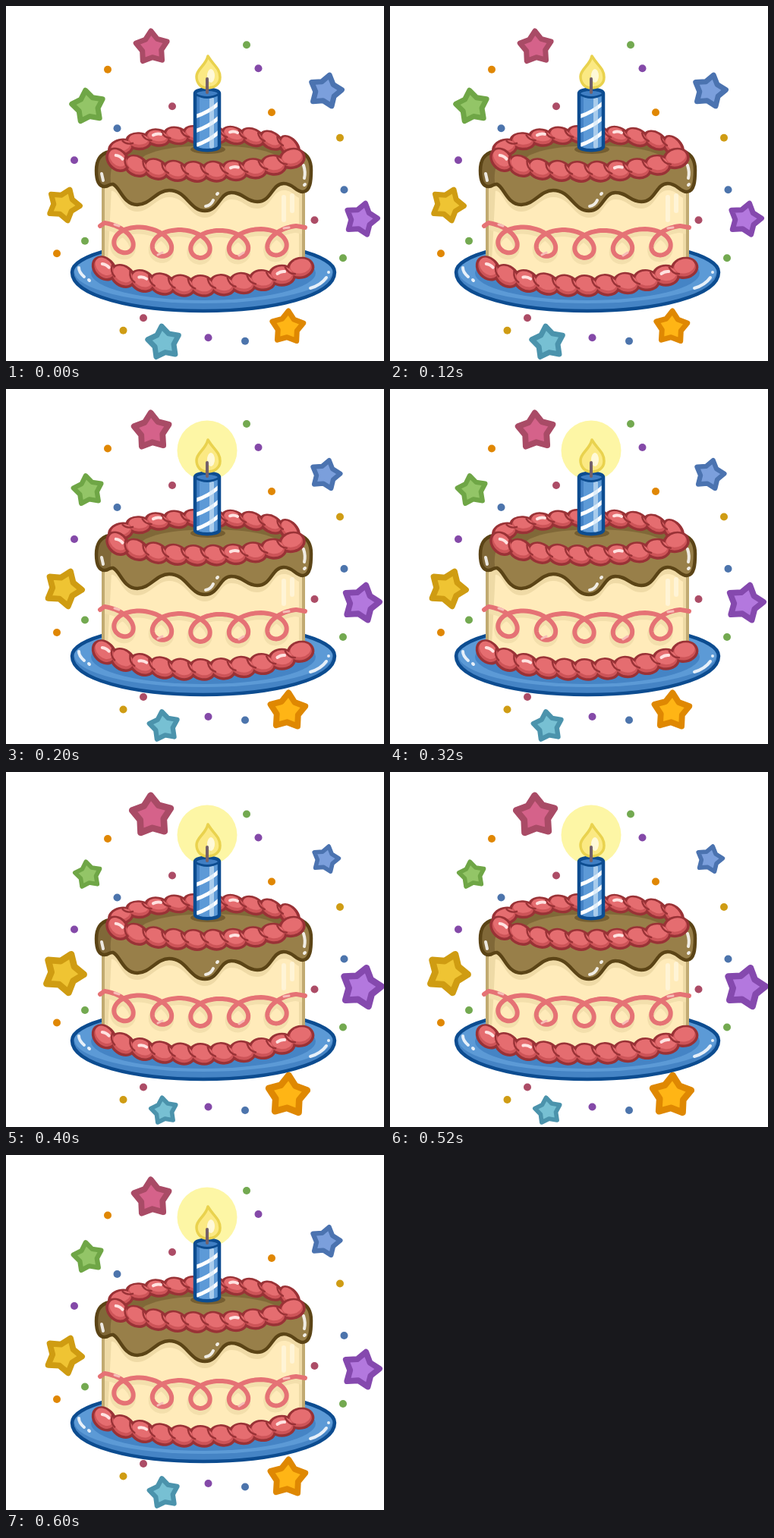
These frames come from a looping animation (498 by 468 pixels, 800 ms). An HTML page:

```html
<!DOCTYPE html>
<html lang="en">
<head>
<meta charset="utf-8">
<title>Birthday cake</title>
<style>
html, body { margin: 0; width: 100%; height: 100%; overflow: hidden; background: #fff; }
svg { display: block; width: 100vw; height: 100vh; }
path { stroke-linecap: round; stroke-linejoin: round; }
.shine { fill: none; stroke: #fff; stroke-width: 4; opacity: .85; }
</style>
</head>
<body>
<svg viewBox="0 0 498 468">
  <defs>
    <path id="drip" d="M136 192 C123 195 119 204 119 217 C119 229 122 238 130 238
      C136 238 136 234 141 235 C150 238 154 262 173 262 C190 262 198 243 215 243
      C238 243 242 270 262 270 C281 270 281 246 297 246 C313 246 316 258 331 258
      C350 258 350 234 366 234 C379 234 381 245 391 245 C401 245 402 230 402 216
      C402 204 398 196 388 192 C350 158 174 158 136 192Z"/>
    <path id="side" d="M128 215 V346 Q260 396 392 346 V215Z"/>
    <path id="plate" d="M87 351 A173 42 0 0 1 433 351 C433 382 352 402 260 402 C168 402 87 382 87 351Z"/>
    <path id="stick" d="M249 115 C249 108 281 108 281 115 V185 C281 192 249 192 249 185Z"/>
    <clipPath id="inSide"><use href="#side"/></clipPath>
    <clipPath id="inDrip"><use href="#drip"/></clipPath>
    <clipPath id="inPlate"><use href="#plate"/></clipPath>
    <clipPath id="inStick"><use href="#stick"/></clipPath>
  </defs>
  <g id="dots"></g>
  <g id="stars"></g>
  <g id="cake">
    <circle id="glow" cx="265" cy="80" r="39.5" fill="#fdf6a5"/>

    <use href="#plate" fill="#4584c5"/>
    <g clip-path="url(#inPlate)">
      <ellipse cx="260" cy="350" rx="170" ry="42" fill="#5c9ad6"/>
      <ellipse cx="260" cy="352" rx="148" ry="36" fill="#4584c5"/>
    </g>
    <use href="#plate" fill="none" stroke="#0c4c90" stroke-width="4.5"/>
    <path class="shine" d="M96 345 Q96 351 103 357 M109 361 L110 362 M401 372 Q415 368 422 358 M425 351 L425 351"/>

    <use href="#side" fill="#ffebba"/>
    <g clip-path="url(#inSide)">
      <path d="M128 215 H140 Q137 290 133 352 H128Z M392 215 H386 V352 H392Z" fill="#eedaa6"/>
      <use href="#drip" y="9" fill="#efdaa6"/>
      <path d="M366 252 V282 M377 250 V270" fill="none" stroke="#fff4d6" stroke-width="6"/>
      <path id="swirlShade" transform="translate(-1 5)" fill="none" stroke="#f3dfac" stroke-width="8"/>
    </g>
    <use href="#side" fill="none" stroke="#c1aa71" stroke-width="4"/>
    <path id="swirl" fill="none" stroke="#e57275" stroke-width="6"/>
    <path d="M143 288 L149 290 M200 328 L206 325 M307 329 L313 325 M366 293 L373 292" stroke="#f7bdb8" stroke-width="3"/>

    <use href="#drip" fill="#987f49"/>
    <path d="M110 190 H152 Q132 212 140 245 H110Z" fill="#806838" clip-path="url(#inDrip)"/>
    <use href="#drip" fill="none" stroke="#5b4416" stroke-width="4.5"/>
    <ellipse cx="262" cy="197" rx="112" ry="24" fill="#806838"/>
    <ellipse cx="270" cy="204" rx="92" ry="20" fill="#987f49"/>
    <ellipse cx="266" cy="189" rx="23" ry="6" fill="#755e31"/>
    <path class="shine" d="M126 221 L128 230 M392 210 Q395 219 393 227 M394 235 L393 236 M263 264 Q270 263 273 256 M278 248 L279 247"/>
    <g id="ropes"></g>

    <use href="#stick" fill="#5d9ad7"/>
    <g clip-path="url(#inStick)">
      <path d="M249 110 H255 V195 H249Z" fill="#4482c6"/>
      <path d="M249 146 Q268 140 283 126 M249 165 Q268 159 283 145 M249 184 Q268 178 283 164" fill="none" stroke="#fff" stroke-width="5"/>
      <path d="M271 123 V185" stroke="#d3e6f8" stroke-width="6" opacity=".65"/>
    </g>
    <ellipse cx="265" cy="115" rx="15" ry="5" fill="#407fc4"/>
    <use href="#stick" fill="none" stroke="#0c4c90" stroke-width="4.5"/>
    <path d="M249 116 Q265 125 281 116" fill="none" stroke="#0c4c90" stroke-width="3"/>
    <path d="M266 66 C273 78 282 82 282 94 C282 103 275 108 265 108 C256 108 251 101 251 93 C251 83 263 79 266 66Z" fill="#fbe983" stroke="#e9d24e" stroke-width="3.5"/>
    <ellipse cx="270" cy="92" rx="5" ry="9" fill="#fff9d8"/>
    <path d="M265 96 V114" stroke="#74616a" stroke-width="4"/>
  </g>
</svg>
<script>
const $ = id => document.getElementById(id);
const deg = Math.PI / 180;

// Twisted icing laid along a path; `shiny` lists the twists with a highlight
function rope(d, count, rx, ry, shiny) {
  const track = document.createElementNS("http://www.w3.org/2000/svg", "path");
  track.setAttribute("d", d);
  const len = track.getTotalLength();
  const at = s => track.getPointAtLength(Math.max(0, Math.min(len, s)));
  const twists = Array.from({ length: count }, (_, i) => {
    const s = (i + .5) * len / count, p = at(s), a = at(s - 3), b = at(s + 3);
    return { x: p.x, y: p.y, turn: Math.atan2(b.y - a.y, b.x - a.x) / deg };
  });
  const layer = (fill, grow, dy) => twists.map(t =>
    `<ellipse rx="${rx + grow}" ry="${ry + grow}" fill="${fill}" transform="translate(${t.x} ${t.y + dy}) rotate(${t.turn + 18})"/>`).join("");
  const each = (shape, list) => list.map(t =>
    `<g transform="translate(${t.x} ${t.y}) rotate(${t.turn})">${shape}</g>`).join("");
  const half = len / count / 2;
  return layer("#993236", 3.5, 0) + layer("#cd5458", 0, 0) + layer("#e56d70", -1.5, -2.5) +
    each(`<path d="M${half - 6} ${-ry + 2} Q${half - 4} 1 ${half + 4} 3" fill="none" stroke="#993236" stroke-width="2.4"/>`, twists.slice(0, -1)) +
    each(`<path d="M-5 -4 Q0 -6 5 -4" fill="none" stroke="#ffe3e1" stroke-width="4"/>`, twists.filter((_, i) => shiny.includes(i)));
}
$("ropes").innerHTML =
  rope("M143 196 C154 161 370 161 382 194", 10, 14, 8.5, [2, 6]) +
  rope("M138 194 C150 227 372 227 386 192", 10, 14.5, 10.5, [0, 6]) +
  rope("M118 339 C148 360 200 369 250 369 S370 362 399 338", 11, 15, 11, [0, 2, 9]);

// Looping piped line on the side
let curl = "M124 290";
for (let u = -.5; u <= 4.51; u += .02) {
  const w = u * 2 * Math.PI, x = 155 + 50.5 * u - 24 * Math.sin(w);
  curl += `L${x.toFixed(1)} ${(314 + 18 * Math.cos(w) - 5 * ((x - 272) / 100) ** 2).toFixed(1)}`;
}
curl += "L394 292";
$("swirl").setAttribute("d", curl);
$("swirlShade").setAttribute("d", curl);

// x, y, tilt, grows, fill, edge
const stars = [
  [192, 54.5, -3, 1, "#d5628a", "#a94b66"],
  [108, 132.5, -9, 0, "#93c567", "#6fa646"],
  [421, 112, 14, 0, "#7b9fdc", "#4b73b0"],
  [76, 262, 22, 1, "#efc433", "#cf9c12"],
  [468, 281, 15, 1, "#b378de", "#8549ae"],
  [208, 443.5, -8, 0, "#77c0d3", "#4b93ac"],
  [371, 423.5, 3, 1, "#ffb515", "#df8802"]
];
const starPath = "M" + Array.from({ length: 10 }, (_, i) => {
  const r = i % 2 ? 13.2 : 21.5, a = (i * 36 - 90) * deg;
  return `${(r * Math.cos(a)).toFixed(2)} ${(r * Math.sin(a)).toFixed(2)}`;
}).join("L") + "Z";
$("stars").innerHTML = stars.map(s =>
  `<path d="${starPath}" fill="${s[4]}" stroke="${s[5]}" stroke-width="7"/>`).join("");

const dots = {
  "#73a950": [[317, 46], [104, 304.5], [444, 327]],
  "#e08703": [[134, 78.5], [350, 135], [67, 321]],
  "#8449a8": [[332.5, 77], [90, 198], [266.5, 432]],
  "#ac4c66": [[219, 127], [406.5, 277], [181, 406]],
  "#cf9c14": [[440, 168.5], [154.5, 422.5]],
  "#4c74ac": [[146.5, 156], [445.5, 237], [315, 436.5]]
};
$("dots").innerHTML = Object.entries(dots).map(([c, list]) =>
  list.map(([x, y]) => `<circle cx="${x}" cy="${y}" r="5" fill="${c}"/>`).join("")).join("");

const poses = [
  { drop: 0, bob: 5.3, size: 0 },
  { drop: 1, bob: 0, size: 1 },
  { drop: 3, bob: 9.5, size: 2 },
  { drop: 2, bob: 1, size: 1 }
];

function draw() {
  const step = Math.floor(performance.now() % 800 / 200);
  const { drop, bob, size } = poses[step];
  $("cake").setAttribute("transform", `translate(0 ${drop})`);
  $("dots").setAttribute("transform", `translate(0 ${bob})`);
  $("glow").style.display = step ? "" : "none";
  stars.forEach(([x, y, tilt, grows], i) => {
    const k = 1 + size * (grows ? .12 : -.095);
    $("stars").children[i].setAttribute("transform", `translate(${x} ${y + drop}) rotate(${tilt}) scale(${k})`);
  });
  requestAnimationFrame(draw);
}
draw();
</script>
</body>
</html>
```
